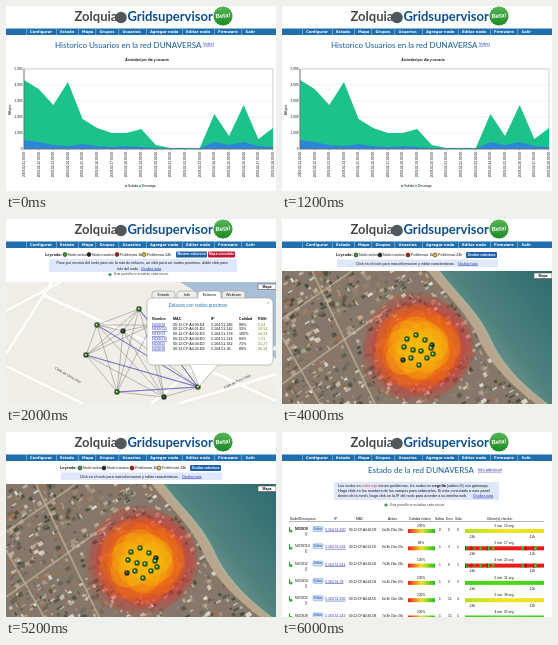
These frames come from a looping animation (270x185 px, 8 s). An HTML page with a canvas:

```html
<!DOCTYPE html>
<html lang="es">
<head>
<meta charset="utf-8">
<style>
html, body { margin: 0; width: 100%; height: 100%; overflow: hidden; background: #fff; }
canvas { display: block; width: 100vw; height: 100vh; }
</style>
</head>
<body>
<canvas id="stage"></canvas>
<script>
const W = 270, H = 185, HOLD = 2000;
const canvas = document.getElementById('stage');
const c = canvas.getContext('2d');
const SANS = '"Liberation Sans", Arial, sans-serif';
const WIDE = '"DejaVu Sans", Verdana, sans-serif';
const HEAD = 'Lato, sans-serif';
const NET = 'DUNAVERSA';
const BLUE = '#1f6fae', TITLE = '#145a9c', LINK = '#2432b0', INK = '#111', NOTE = '#dfe7fb';

function text(s, x, y, size, color = INK, o = {}) {
  c.save();
  c.translate(x, y);
  if (o.rot) c.rotate(o.rot);
  c.font = `${o.bold ? 'bold ' : ''}${size}px ${o.font || SANS}`;
  c.textAlign = o.align || 'left';
  c.textBaseline = 'middle';
  c.fillStyle = color;
  c.fillText(s, 0, 0);
  if (o.line) {
    const w = c.measureText(s).width;
    c.fillRect(o.align === 'center' ? -w / 2 : 0, size * 0.45, w, 0.5);
  }
  c.restore();
}

function rect(x, y, w, h, fill, stroke) {
  if (fill) { c.fillStyle = fill; c.fillRect(x, y, w, h); }
  if (stroke) { c.strokeStyle = stroke; c.lineWidth = 0.6; c.strokeRect(x, y, w, h); }
}

function round(x, y, w, h, r, fill, stroke) {
  c.beginPath();
  c.roundRect(x, y, w, h, r);
  c.fillStyle = fill;
  c.fill();
  if (stroke) { c.strokeStyle = stroke; c.lineWidth = 0.6; c.stroke(); }
}

function disc(x, y, r, fill, stroke, lw = 1) {
  c.beginPath();
  c.arc(x, y, r, 0, Math.PI * 2);
  c.fillStyle = fill;
  c.fill();
  if (stroke) { c.strokeStyle = stroke; c.lineWidth = lw; c.stroke(); }
}

function path(pts, color, lw, fill) {
  c.beginPath();
  pts.forEach(([x, y], i) => i ? c.lineTo(x, y) : c.moveTo(x, y));
  if (fill) { c.closePath(); c.fillStyle = color; c.fill(); }
  else { c.strokeStyle = color; c.lineWidth = lw; c.lineJoin = 'round'; c.stroke(); }
}

function seeded(seed) {
  return () => (seed = (seed * 16807) % 2147483647) / 2147483647;
}

function button(s, x, y, w, color) {
  round(x, y - 3, w, 6, 1, color);
  text(s, x + w / 2, y, 3.3, '#fff', { bold: true, align: 'center' });
}

function header() {
  rect(0, 0, W, H, '#fff');
  text('Zolquia', 68.5, 11, 13, '#44484b', { font: HEAD, bold: true });
  disc(115, 11.5, 5.8, '#50575d');
  text('Gridsupervisor', 121.5, 11, 13, '#0c4f8f', { font: HEAD, bold: true });
  c.beginPath();
  for (let i = 0; i < 40; i++) {
    const a = i * Math.PI / 20, r = i % 2 ? 9.2 : 9.8;
    c.lineTo(217 + r * Math.cos(a), 10 + r * Math.sin(a));
  }
  c.closePath();
  const shine = c.createLinearGradient(0, 1, 0, 20);
  shine.addColorStop(0, '#55b455');
  shine.addColorStop(1, '#188a20');
  c.fillStyle = shine;
  c.fill();
  text('Beta!', 217, 10, 6, '#fff', { bold: true, align: 'center', rot: -0.08 });
  rect(0, 22.5, W, 6.5, BLUE);
  const menu = [['Configurar', 24], ['Estado', 54], ['Mapa', 76], ['Grupos', 93.5], ['Usuarios', 116.5],
    ['Agregar nodo', 144], ['Editar nodo', 180], ['Firmware', 212], ['Salir', 239.5]];
  for (const [s, x] of menu) {
    rect(x - 4, 22.5, 0.6, 6.5, '#9cc3e2');
    text(s, x, 26, 3.7, '#fff', { font: WIDE, bold: true });
  }
}

function legend(x, y) {
  text('Leyenda:', x, y, 3.8, INK, { bold: true });
  const items = [['Nodo activo', '#2f9a2c', 20], ['Nodo inactivo', '#222', 44],
    ['Problemas 1h', '#b5161c', 72], ['Problemas 24h', '#f0c02c', 99]];
  for (const [s, color, dx] of items) {
    disc(x + dx, y, 2, color, '#222', 0.6);
    text(s, x + dx + 3, y, 3.6);
  }
}

function refreshNote(x, y) {
  disc(x, y, 1.6, '#3c9a52');
  text('Esta pantalla se actualiza cada minuto.', x + 4, y, 3.2, '#444');
}

function history() {
  text('Historico Usuarios en la red ' + NET, 49, 39.5, 8, TITLE, { font: HEAD });
  text('Volver', 197, 38, 4, LINK, { line: true });
  text('Actividad por dia y usuario', 141, 54.5, 3.4, INK, { bold: true, align: 'center' });

  const x0 = 18, y0 = 143, step = 249 / 17;
  const down = [74, 83, 99, 76, 113, 122, 127, 127, 123, 139, 142, 142, 142, 108, 130, 99, 133, 122];
  const up = [134, 136, 139, 140, 138, 140, 141, 140, 141, 142, 142.5, 142.5, 142.5, 136, 139, 136, 140, 141];
  rect(x0, 63, 249, 80, '#fff', '#aaa');
  for (let i = 0; i <= 5; i++) {
    const y = y0 - i * 16;
    path([[x0, y], [267, y]], '#dedede', 0.5);
    text(i ? i + ',000' : '0', 16.5, y, 3.2, INK, { align: 'right' });
  }
  const area = (ys, color) =>
    path([[x0, y0], ...ys.map((y, i) => [x0 + i * step, y]), [267, y0]], color, 0, true);
  area(down, '#1dc28b');
  area(up, '#2d86d5');
  path([[x0, 63], [x0, y0], [267, y0]], '#666', 0.7);
  for (let i = 0; i < 18; i++) {
    const x = x0 + i * step;
    path([[x, y0], [x, y0 + 1.5]], '#666', 0.5);
    text(`2009-02-${String(11 + i).padStart(2, '0')} 00:00`, x, 146, 3.2, INK,
      { rot: -Math.PI / 2, align: 'right' });
  }
  text('MBytes', 4, 104, 3.2, INK, { rot: -Math.PI / 2, align: 'center' });
  disc(120, 180, 1.1, '#2d86d5');
  text('Subida', 122, 180, 3.2);
  disc(134, 180, 1.1, '#1dc28b');
  text('Descarga', 136, 180, 3.2);
}

function clip(y) {
  c.save();
  c.beginPath();
  c.rect(0, y, W, H - y);
  c.clip();
}

function mapTag(y) {
  rect(252, y, 18, 5.5, '#fff', '#555');
  text('Mapa', 261, y + 2.9, 3.5, INK, { bold: true, align: 'center' });
}

function nodeDot(x, y, active) {
  rect(x - 2.4, y - 2.4, 4.8, 4.8, 'rgba(20,35,18,.55)');
  disc(x, y, 2.1, active ? '#45a82c' : '#2c352c', '#132810', 0.9);
  disc(x - 0.5, y - 0.5, 0.8, active ? '#d5eda6' : '#77806f');
}

function links() {
  legend(39, 35.5);
  button('Mostrar cobertura', 170, 35.5, 31, '#1d62ad');
  button('Mapa extendido', 202, 35.5, 27, '#c01a33');
  rect(43, 40, 188, 13, NOTE);
  text('Pase por encima del nodo para ver la ruta de enlaces, un click para ver nodos proximos, doble click para', 136, 44, 3.7, INK, { align: 'center' });
  text('info del nodo.', 111, 49.5, 3.7);
  text('Ocultar nota', 135, 49.5, 3.7, LINK, { line: true });
  refreshNote(104, 55.5);

  clip(63);
  rect(0, 63, W, 122, '#f0eee7');
  path([[174, 63], [270, 63], [270, 140], [205, 82]], '#a9bfd8', 0, true);
  const roads = [[[0, 92], [58, 61]], [[0, 135], [42, 69], [47, 61]], [[0, 147], [78, 185]],
    [[37, 76], [126, 116], [270, 182]], [[145, 185], [193, 145], [270, 129]], [[172, 185], [270, 155]]];
  for (const r of roads) path(r, '#dedbd1', 4.4);
  for (const r of roads) path(r, '#fcfcf8', 3.6);
  text('Calle de Olmo Alto', 49, 149, 3.5, '#444', { rot: 0.52 });
  text('Calle de Pino Viejo', 218, 169, 3.5, '#444', { rot: -0.45 });

  const nodes = [[133, 90], [91, 106], [117, 112], [80, 136], [146, 106], [158, 178], [111, 173], [192, 168]];
  const hub = nodes[7];
  for (let i = 0; i < 7; i++)
    for (let j = i + 1; j < 8; j++) path([nodes[i], nodes[j]], 'rgba(105,100,105,.6)', 0.7);
  for (const i of [1, 3, 6, 0]) path([nodes[i], hub], 'rgba(88,82,214,.7)', 1);
  nodes.forEach(([x, y], i) => nodeDot(x, y, i !== 2 && i !== 5));
  mapTag(65);

  const tail = [[184, 146], [193, 167], [212, 146]];
  const tabs = [['Estado', 146, 23], ['Info', 171, 20], ['Enlaces', 192, 23], ['Webcam', 216, 23]];
  tabs.forEach(([s, x, w], i) => {
    round(x, 72, w, 10, 3, i === 2 ? '#fff' : '#eeeeea', '#999');
    text(s, x + w / 2, 76, 3.8, INK, { align: 'center' });
  });
  round(141, 79, 126, 67, 5, '#fff', '#999');
  path(tail, '#fff', 0, true);
  path(tail, '#999', 0.6);
  rect(192.4, 78, 22.2, 2, '#fff');
  text('Enlaces con nodos proximos', 192, 87, 4.6, '#2d73b4', { align: 'center' });
  text('×', 262, 84, 4, '#666', { align: 'center' });
  const cols = [146, 167, 205, 233, 252];
  const row = (cells, y, bold) => cells.forEach((s, i) => {
    const color = bold ? INK : i === 0 ? LINK : i === 4 ? '#6d8420' : INK;
    text(s, cols[i], y, 3.7, color, { bold, line: !bold && !i });
  });
  row(['Nombre', 'MAC', 'IP', 'Calidad', 'RSSI'], 100, true);
  const peers = [[4, 246, 88, 5.24], [12, 142, 93, 19.52], [3, 178, 100, 24.21], [10, 214, 84, 5.31], [2, 162, 75, 21.27], [8, 36, 80, 36.24]];
  peers.forEach(([n, ip, q, rssi], i) =>
    row(['NODO' + n, `00:12:CF:A4:3${i}:D${n % 10}`, '5.164.51.' + ip, q + '%', String(rssi)], 105.5 + i * 4.9));
  c.restore();
}

function aerial() {
  rect(0, 52, W, 133, '#85786a');
  const rnd = seeded(72);
  const tones = ['#c4b096', '#4a4a3c', '#a08670', '#ece8e0', '#3c4634', '#a3704f', '#d8cdbb', '#6b6354'];
  for (let i = 0; i < 1100; i++) {
    c.save();
    c.translate(rnd() * W, 52 + rnd() * 133);
    c.rotate(-0.55);
    c.globalAlpha = 0.45 + rnd() * 0.45;
    rect(0, 0, 1 + rnd() * 5, 1 + rnd() * 3.5, tones[Math.floor(rnd() * tones.length)]);
    c.restore();
  }
  for (const r of [[[0, 100], [70, 52]], [[0, 165], [105, 90]], [[30, 52], [93, 185]], [[0, 118], [38, 185]]])
    path(r, 'rgba(196,182,160,.7)', 1.8);

  const coast = (dx, fill) => {
    c.beginPath();
    c.moveTo(146 + dx, 52);
    c.bezierCurveTo(164 + dx, 76, 184 + dx, 92, 196 + dx, 118);
    c.bezierCurveTo(206 + dx, 142, 226 + dx, 164, 254 + dx, 185);
    c.lineTo(280, 185);
    c.lineTo(280, 45);
    c.closePath();
    c.fillStyle = fill;
    c.fill();
  };
  const sea = c.createLinearGradient(182, 130, 270, 60);
  sea.addColorStop(0, '#7f9c90');
  sea.addColorStop(0.35, '#4f827f');
  sea.addColorStop(1, '#2f6b6f');
  coast(0, '#b9a68c');
  coast(9, '#a9b09c');
  coast(12, sea);
}

function coverage() {
  legend(54, 36);
  button('Ocultar cobertura', 184, 36, 31, '#1d62ad');
  rect(55, 40.5, 161, 7.5, NOTE);
  text('Click en el nodo para mas informacion y editar caracteristicas.', 74, 44.5, 3.6);
  text('Ocultar nota', 176, 44.5, 3.6, LINK, { line: true });

  clip(52);
  aerial();
  const nodes = [[134, 116], [125, 120], [143, 121], [150, 126], [122, 128], [131, 131], [139, 132],
    [151, 135], [145, 139], [121, 141], [137, 146], [129, 139], [149, 129]];
  const halos = [[41, 'rgba(228,40,38,.13)'], [29, 'rgba(240,124,14,.24)'], [17, 'rgba(246,190,16,.3)']];
  for (const [r, color] of halos)
    for (const [x, y] of nodes) disc(x, y - 2, r, color, 'rgba(205,60,25,.1)', 0.5);
  nodes.forEach(([x, y], i) => nodeDot(x, y, i % 6 !== 3));
  mapTag(54);
  c.restore();
}

function bar(x, y, w, kind) {
  const g = c.createLinearGradient(x, 0, x + w, 0);
  const sets = { quality: ['#e8201a', '#f2e224', '#1fc01f'], mixed: ['#b6e01c', '#f4e61c', '#e9e01c'],
    good: ['#3fd01c', '#52d81c', '#3fd01c'], bad: ['#e01c1c', '#e8201a', '#e01c1c'] };
  sets[kind].forEach((color, i) => g.addColorStop(i / 2, color));
  rect(x, y, w, 4, g);
  if (kind === 'bad') {
    const rnd = seeded(19);
    for (let i = 0; i < 14; i++) rect(x + rnd() * (w - 3), y, 0.7 + rnd() * 2, 4, i % 3 ? '#42c81e' : '#a81010');
  }
}

function status() {
  text('Estado de la red ' + NET, 86, 39, 8, TITLE, { font: HEAD });
  text('Info adicional', 196, 38, 4, LINK, { line: true });
  rect(52, 50, 165, 18, NOTE);
  let x = 56;
  const runs = [['Los nodos en ', INK], ['color rojo', '#e02a1d'], [' tienen problemas, los nodos en ', INK],
    ['negrilla', INK, true], [' (saltos=0) son gateways.', INK]];
  for (const [s, color, bold] of runs) {
    text(s, x, 54, 3.8, color, { bold });
    c.font = `${bold ? 'bold ' : ''}3.8px ${SANS}`;
    x += c.measureText(s).width;
  }
  text('Haga click en los nombres de los campos para ordenarlos. Si esta conectado a este panel', 56, 59, 3.8);
  text('dentro de la mesh, haga click en la IP del nodo para acceder a su interfaz web.', 56, 64, 3.7);
  text('Ocultar nota', 191, 64, 3.7, LINK, { line: true });
  refreshNote(104, 73);

  const heads = [['Nodo/Descripcion', 8], ['IP', 52], ['MAC', 74], ['Activo', 106], ['Calidad enlace', 127],
    ['Saltos', 153], ['Envi.', 164], ['Subi.', 173], ['Ultimo(s) checkin', 205]];
  for (const [s, hx] of heads) text(s, hx, 87, 3.3);
  path([[7, 89.5], [262, 89.5]], '#666', 0.5);
  const rows = [[9, 200, 'mixed'], [10, 232, 'bad'], [2, 241, 'bad'], [4, 78, 'good'], [5, 206, 'mixed'], [8, 142, 'good']];
  rows.forEach(([n, ip, kind], i) => {
    const y = 99 + i * 17.3;
    const lag = `${2 + i % 3} min. ${10 + i * 7} seg`;
    rect(7, y - 4, 1, 5, '#2e9a34');
    disc(9, y, 1.5, '#43b043');
    text('NODO' + n, 13, y - 2, 3.6, INK, { bold: i === 0 });
    text('()', 23, y + 3, 3.4);
    round(31, y - 4.5, 10, 5, 1, '#cfe2f5', '#7ea9d0');
    text('Editar', 36, y - 2, 3, LINK, { align: 'center' });
    text('5.164.51.' + ip, 43, y - 1, 3.5, LINK, { line: true });
    text(`00:12:CF:A4:4${i}:D${n % 10}`, 67, y - 1, 3.2);
    text(`${5 + i % 3}d 4h ${20 + i * 3}m ${24 + i}s`, 100, y - 1, 3.2);
    text(i === 1 ? '88%' : '100%', 139, y - 5, 3.2, INK, { align: 'center' });
    bar(126, y - 2, 27, 'quality');
    [i ? 1 : 0, i * 3, i].forEach((v, k) => text(String(v), 157 + k * 9, y - 1, 3.3));
    text(lag, 222, y - 5, 3.2, INK, { align: 'center' });
    bar(183, y - 2, 79, kind);
    text('-24h', 190, y + 6, 3.2, INK, { align: 'center' });
    text('-12h', 250, y + 6, 3.2, INK, { align: 'center' });
  });
}

const scenes = [history, links, coverage, status];
let shown = '';

function render(now) {
  const index = Math.floor(now / HOLD) % scenes.length;
  const w = Math.round(innerWidth * devicePixelRatio);
  const h = Math.round(innerHeight * devicePixelRatio);
  const key = [index, w, h].join();
  if (key !== shown) {
    shown = key;
    canvas.width = w;
    canvas.height = h;
    c.setTransform(w / W, 0, 0, h / H, 0, 0);
    header();
    scenes[index]();
  }
}

const start = performance.now();
function tick() {
  render(performance.now() - start);
  requestAnimationFrame(tick);
}
tick();
</script>
</body>
</html>
```
